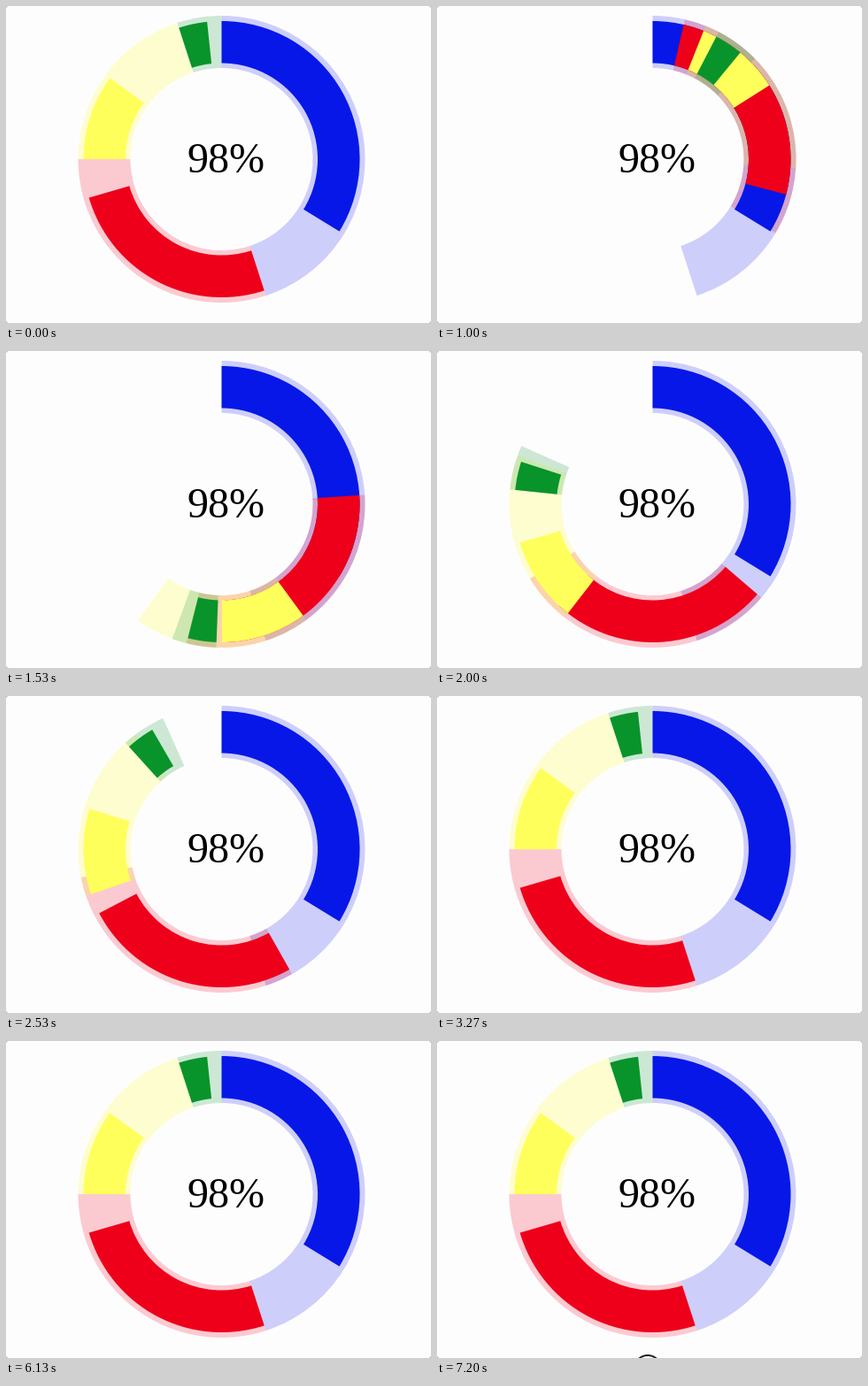
Animation, 480 px wide and 358 px high, one loop 7.27 s. Source, as a matplotlib script:

```python
import matplotlib.pyplot as plt
import numpy as np
from matplotlib.animation import FuncAnimation
from matplotlib.patches import Circle, Polygon, Wedge

W, H, DPI = 480, 358, 100
LOOP, FRAMES = 7270, 109
CENTER = (243.5, 173)
START, SPIN = 869, 2450  # ms: reset moment and length of the turn

# share of the ring, filled part, fill colour, track colour
SLICES = [
    (0.45, 0.75, "#0617e8", "#0a14eb"),
    (0.30, 0.85, "#ee001a", "#f0001e"),
    (0.20, 0.50, "#ffff5c", "#ffff19"),
    (0.05, 0.665, "#08942a", "#089430"),
]

# cubic-bezier(.1, 0, .17, 1)
s = np.linspace(0, 1, 801)
EASE_X = 0.3 * s * (1 - s) ** 2 + 0.51 * s**2 * (1 - s) + s**3
EASE_Y = 3 * s**2 - 2 * s**3


def turn(t):
    if t < START:
        return 1.0
    return float(np.interp((t - START) / SPIN, EASE_X, EASE_Y))


fig = plt.figure(figsize=(W / DPI, H / DPI), dpi=DPI, facecolor="#fefdfe")
ax = fig.add_axes([0, 0, 1, 1])
ax.set(xlim=(0, W), ylim=(H, 0))
ax.axis("off")


def px(n):
    return n * 72 / DPI


def add_wedge(outer, inner, color, alpha, z):
    w = Wedge(CENTER, outer, 0, 1, width=outer - inner, fc=color, lw=0,
              alpha=alpha, zorder=z)
    return ax.add_patch(w)


parts = []
offset = 0
for k, (share, fill, color, track) in enumerate(SLICES):
    span = 360 * share
    parts.append((add_wedge(162, 103, track, 0.2, 1 + k), offset, span))
    parts.append((add_wedge(156, 108.5, color, 1, 10 + k), offset, span * fill))
    offset += span

ax.text(248, 187.5, "98%", family="Liberation Serif", size=px(48),
        color="black", ha="center", va="baseline", zorder=20)

# window corners
for x, dx in ((0, 2.5), (W, -2.5)):
    for y, dy in ((0, 2.5), (H, -2.5)):
        ax.add_patch(Polygon([(x, y), (x + dx, y), (x, y + dy)],
                             fc="#c8c8c8", lw=0))

ring = ax.add_patch(Circle((238, 380), 15, fill=False, ec="#222222",
                           lw=px(2), zorder=21))


def update(i):
    t = i * LOOP / FRAMES
    p = turn(t)
    for wedge, start, span in parts:
        a = start * p - 90
        wedge.set_theta1(a)
        wedge.set_theta2(a + span)
    rise = np.clip((t - 6650) / 350, 0, 1)
    ring.set_center((238, 376 - 6 * rise))
    return [w for w, _, _ in parts] + [ring]


anim = FuncAnimation(fig, update, frames=FRAMES, interval=LOOP / FRAMES,
                     repeat=True, repeat_delay=0, blit=False)
plt.show()
```
